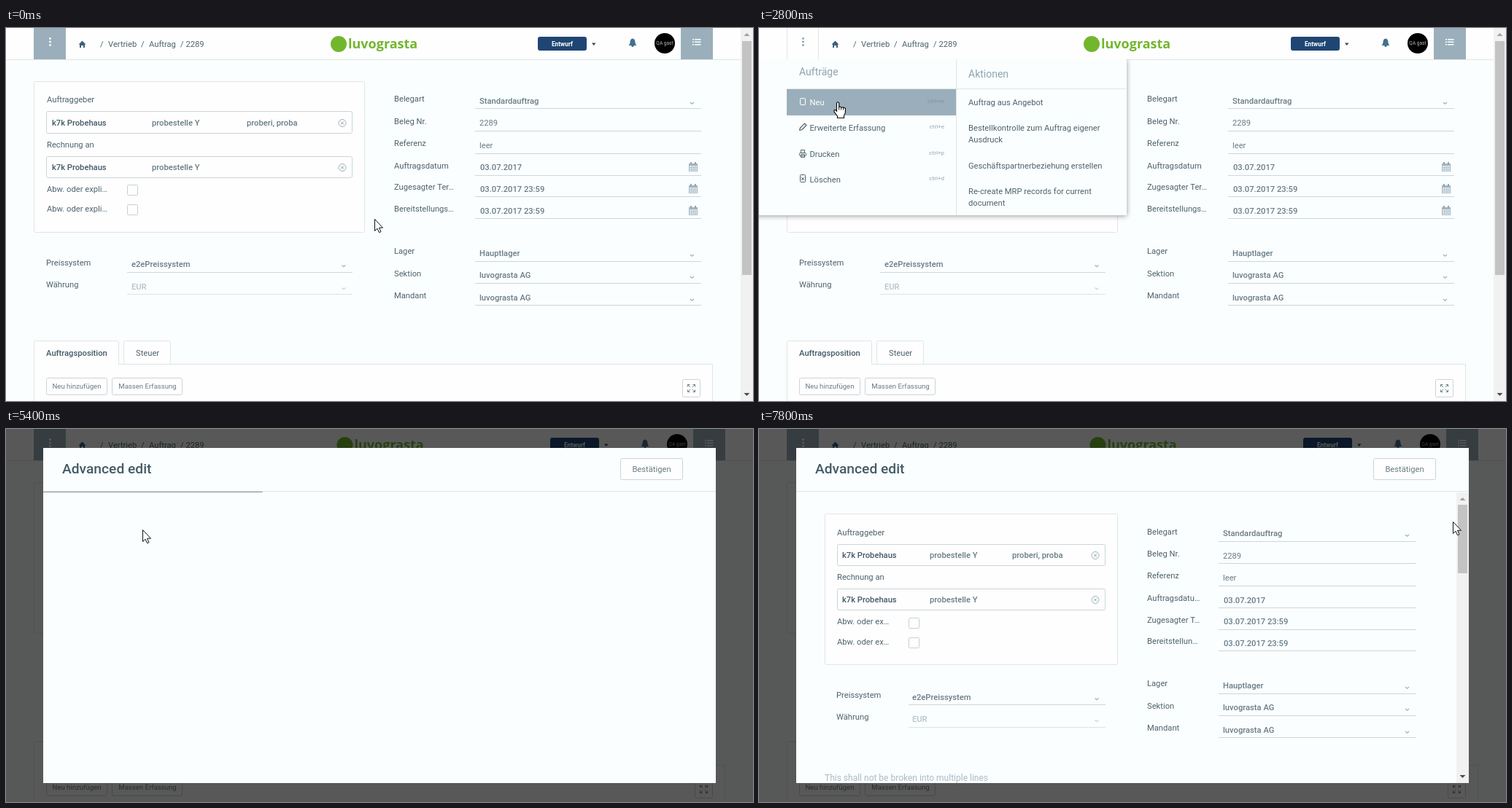
These frames come from a looping animation (1024x512 px, 8 s). An HTML page with a canvas:

```html
<!DOCTYPE html>
<html lang="de">
<head>
<meta charset="utf-8">
<title>Auftrag</title>
<style>
html, body { margin: 0; width: 100%; height: 100%; overflow: hidden; background: #fbfefe; }
canvas { display: block; }
</style>
</head>
<body>
<canvas id="stage" width="1024" height="512"></canvas>
<script>
const ctx = document.getElementById('stage').getContext('2d');
const LOOP = 8000, STEP = 200;
const C = {
  page: '#fbfefe', panel: '#fefefe', border: '#dfe5e7', box: '#cbd4d8', line: '#ccd6da',
  label: '#4d636e', dark: '#435a66', value: '#697c86', pale: '#b4c2ca', steel: '#9aafbb',
  steelDark: '#5a788a', navy: '#1f4673', icon: '#3c617f', green: '#72b62e'
};
const ORG = 'luvograsta', FIRM = 'k7k Probehaus', PLACE = 'probestelle Y', PERSON = 'proberi, proba';

// time, x, y of the pointer tip
const PATH = [
  [0, 505, 262], [200, 505, 262], [1400, 60, 29], [2200, 60, 29], [2800, 108, 101],
  [3200, 77, 128], [4000, 246, 144], [4200, 246, 144], [5000, 187, 138], [5800, 187, 138],
  [6200, 243, 138], [7000, 824, 193], [7200, 824, 193], [7800, 951, 127], [8000, 951, 127]
];

// label, short label, value, kind, y of label, value and underline
const ROWS = [
  ['Belegart', '', 'Standardauftrag', 'select', 97.3, 100, 110.3],
  ['Beleg Nr.', '', '2289', 'plain', 128, 130.3, 141],
  ['Referenz', '', 'leer', 'plain', 158, 161, 172],
  ['Auftragsdatum', 'Auftragsdatu…', '03.07.2017', 'date', 189, 191.3, 202],
  ['Zugesagter Ter…', 'Zugesagter T…', '03.07.2017 23:59', 'date', 218.3, 221, 231.3],
  ['Bereitstellungs…', 'Bereitstellun…', '03.07.2017 23:59', 'date', 248, 251, 261],
  ['Lager', '', 'Hauptlager', 'select', 306, 309, 320],
  ['Sektion', '', ORG + ' AG', 'select', 337, 339, 350],
  ['Mandant', '', ORG + ' AG', 'select', 367, 370, 380]
];
const WIDE = { dy: 0, panel: 38, label: 56, box: 55, cols: [63, 200, 330], check: 166, value: 172, field: 643, end: 953 };
const NARROW = { dy: 43.4, panel: 90, label: 107, box: 107, cols: [114, 234, 347], check: 205, value: 210, field: 630, end: 901, short: true };

function rect(x, y, w, h, color) {
  ctx.fillStyle = color;
  ctx.fillRect(x, y, w, h);
}

function frame(x, y, w, h, stroke, fill, r = 2) {
  ctx.beginPath();
  ctx.roundRect(x + .5, y + .5, w - 1, h - 1, r);
  if (fill) { ctx.fillStyle = fill; ctx.fill(); }
  ctx.strokeStyle = stroke;
  ctx.lineWidth = 1;
  ctx.stroke();
}

function disc(x, y, r, color) {
  ctx.beginPath();
  ctx.arc(x, y, r, 0, Math.PI * 2);
  ctx.fillStyle = color;
  ctx.fill();
}

function poly(points, fill, stroke, width = 1) {
  ctx.beginPath();
  points.forEach(([x, y]) => ctx.lineTo(x, y));
  if (fill) { ctx.closePath(); ctx.fillStyle = fill; ctx.fill(); }
  if (stroke) { ctx.strokeStyle = stroke; ctx.lineWidth = width; ctx.stroke(); }
}

// y is the middle of the capitals
function text(str, x, y, color = C.label, { size = 11.2, weight = 400, align = 'left', family = 'Roboto' } = {}) {
  ctx.font = `${weight} ${size}px ${family}, sans-serif`;
  ctx.textAlign = align;
  ctx.fillStyle = color;
  ctx.fillText(str, x, Math.round(y + size * .355));
}

const medium = { weight: 500 };

function chevron(x, y, color = '#9fb0b9') {
  poly([[x - 2.5, y - 1], [x, y + 1.3], [x + 2.5, y - 1]], null, color, 1.2);
}

function calendar(x, y) {
  rect(x, y + 1, 12, 11, '#a3b5bf');
  rect(x + 2, y - 1, 2, 3, '#8fa5b1');
  rect(x + 8, y - 1, 2, 3, '#8fa5b1');
  for (let i = 0; i < 12; i++) rect(x + 1 + i % 4 * 2.7, y + 4 + (i / 4 | 0) * 2.7, 1.9, 1.8, '#f2f7f8');
}

function clearIcon(x, y) {
  ctx.beginPath();
  ctx.arc(x, y, 5, 0, Math.PI * 2);
  ctx.strokeStyle = '#9db1bc';
  ctx.lineWidth = 1;
  ctx.stroke();
  poly([[x - 2, y - 2], [x + 2, y + 2]], null, '#8aa1ae');
  poly([[x + 2, y - 2], [x - 2, y + 2]], null, '#8aa1ae');
}

function scrollbar(x, top, bottom, thumbTop, thumbBottom) {
  const mid = x + 8.5;
  rect(x, top, 17, bottom - top, '#f1f1f1');
  rect(x + 2, thumbTop, 13, thumbBottom - thumbTop, '#c3c3c3');
  poly([[mid - 4, top + 11], [mid, top + 7], [mid + 4, top + 11]], '#a0a0a0');
  poly([[mid - 4, bottom - 11], [mid, bottom - 7], [mid + 4, bottom - 11]], '#4c4c4c');
}

function form(o) {
  const at = y => Math.round(y + o.dy);
  const partner = (label, labelY, boxY, h, valueY, values) => {
    text(label, o.label, at(labelY));
    frame(o.box, at(boxY), 475 - o.box, h, C.box, C.panel);
    values.forEach((v, i) => text(v, o.cols[i], at(valueY), i ? C.value : C.dark, medium));
    clearIcon(461, at(valueY) + .5);
  };
  frame(o.panel, at(73), 492 - o.panel, 208, C.border, C.panel);
  partner('Auftraggeber', 98.3, 114.3, o.short ? 30 : 31, 130, [FIRM, PLACE, PERSON]);
  partner('Rechnung an', 160, 176, 30, 191, [FIRM, PLACE]);
  [[221, 215.3], [248.3, 242.3]].forEach(([labelY, boxY]) => {
    text(o.short ? 'Abw. oder ex…' : 'Abw. oder expli…', o.label, at(labelY));
    frame(o.check, at(boxY), 15, 15, '#c6d0d5', C.panel, 1);
  });
  [['Preissystem', 'e2ePreissystem', 322, 324.3, 335, C.value, C.line],
   ['Währung', 'EUR', 352, 355, 365.3, C.pale, '#dde4e7']].forEach(([label, value, ly, vy, uy, color, under]) => {
    text(label, o.label - 1, at(ly));
    text(value, o.value, at(vy), color, medium);
    rect(o.check, at(uy), 475 - o.check, 1, under);
    chevron(463, at(vy) + 2.5, under === C.line ? undefined : '#ccd6db');
  });
  ROWS.forEach(([label, short, value, kind, ly, vy, uy]) => {
    text(o.short && short || label, 532, at(ly));
    text(value, o.field + (kind === 'date' ? 7 : 6), at(vy), C.value, kind === 'plain' ? {} : medium);
    rect(o.field, at(uy), o.end - o.field, 1, C.line);
    if (kind === 'select') chevron(o.end - 12.5, at(vy) + 3);
    if (kind === 'date' && !o.short) calendar(o.end - 17, at(vy) - 6);
  });
}

function header(dx, button) {
  rect(0, 0, 1024, 43, C.panel);
  rect(0, 43, 1024, 1, C.border);
  rect(38, 0, 44, 43, button);
  if (button === C.panel) {
    rect(38, 0, 1, 43, C.border);
    rect(81, 0, 1, 43, C.border);
  }
  for (let i = 0; i < 3; i++) disc(60.5, 14.5 + i * 4.5, 1.4, button === C.panel ? '#8ba1ae' : '#fff');

  poly([[99.5, 22.5], [104.5, 17.5], [109.5, 22.5], [108, 22.5], [108, 27], [106, 27], [106, 24],
        [103, 24], [103, 27], [101, 27], [101, 22.5]], C.icon);
  [['/', 129], ['Vertrieb', 140], ['/', 185], ['Auftrag', 196], ['/ 2289', 239]]
    .forEach(([s, x]) => text(s, x, 22));

  disc(456 + dx / 2, 22, 11, C.green);
  text(ORG, 469 + dx / 2, 21.5, C.green, { size: 18, weight: 700, family: '"Open Sans"' });

  ctx.save();
  ctx.translate(dx, 0);
  frame(729, 12, 67, 19, C.navy, C.navy);
  text('Entwurf', 762.5, 22, '#fff', { size: 8.4, weight: 700, align: 'center' });
  poly([[803, 20.5], [808.5, 20.5], [805.75, 24]], '#2c4a63');
  ctx.beginPath();
  ctx.moveTo(853.5, 24);
  ctx.bezierCurveTo(857, 21, 854, 15, 859, 14.5);
  ctx.bezierCurveTo(864, 15, 861, 21, 864.5, 24);
  ctx.fillStyle = '#44708f';
  ctx.fill();
  disc(859, 24.5, 1.6, '#44708f');
  disc(903, 21, 14, '#000');
  text('QA gast', 903, 21, '#b5b5b5', { size: 6.6, align: 'center' });
  rect(925, 0, 44, 43, C.steel);
  for (let i = 0; i < 3; i++) {
    rect(941, 15 + i * 3.5, 2, 1.5, '#fff');
    rect(944, 15 + i * 3.5, 8.5, 1.5, '#fff');
  }
  ctx.restore();
}

function tabs(dx) {
  const right = 969 + dx;
  frame(38, 461, right - 38, 80, C.border, C.panel, 0);
  frame(161, 429, 65, 33, C.border, C.panel);
  frame(38, 429, 117, 40, C.border, C.panel);
  rect(39, 461, 115, 10, C.panel);
  rect(154, 462, 1, 8, C.panel);
  text('Auftragsposition', 55, 446, C.dark, medium);
  text('Steuer', 178, 446);
  frame(55, 480, 84, 24, C.box);
  frame(145, 480, 97, 24, C.box);
  text('Neu hinzufügen', 97, 492, C.value, { size: 9.6, align: 'center' });
  text('Massen Erfassung', 194, 492, C.value, { size: 9.6, align: 'center' });
  frame(right - 42, 482, 25, 25, C.box);
  for (const sx of [-1, 1]) for (const sy of [-1, 1]) {
    const x = right - 29.5, y = 494.5;
    poly([[x + sx * 2, y + sy * 5], [x + sx * 5, y + sy * 5], [x + sx * 5, y + sy * 2]], null, '#6d828d');
    poly([[x + sx * 1.5, y + sy * 1.5], [x + sx * 5, y + sy * 5]], null, '#6d828d');
  }
}

function page(button, dx = 0) {
  rect(0, 0, 1024, 512, C.page);
  form(WIDE);
  tabs(dx);
  header(dx, button);
  if (!dx) scrollbar(1007, 0, 512, 18, 339);
}

const ICONS = [
  (y, c) => frame(56, y - 6, 8, 10, c, null, 1.5),
  (y, c) => {
    poly([[55.5, y + 3.5], [56.5, y], [62.5, y - 6], [65, y - 3.5], [59, y + 2.5]], null, c, 1.2);
    poly([[59, y + 2.5], [55.5, y + 3.5]], null, c, 1.2);
  },
  (y, c) => {
    frame(57, y - 6, 6, 5, c, null, 0);
    frame(55, y - 2, 10, 5, c, null, 1);
    frame(57, y, 6, 5, c, null, 0);
  },
  (y, c) => {
    frame(56, y - 7, 8, 11, c, null, 1);
    poly([[58, y - 3], [62, y + 1]], null, c);
    poly([[62, y - 3], [58, y + 1]], null, c);
  }
];

function menu(active) {
  ctx.save();
  ctx.beginPath();
  ctx.rect(0, 43, 1024, 469);
  ctx.clip();
  ctx.shadowColor = 'rgba(0,0,0,.4)';
  ctx.shadowBlur = 7;
  ctx.shadowOffsetY = 1;
  rect(-10, 43, 514, 214, C.page);
  ctx.restore();
  rect(270, 43, 1, 214, C.border);
  rect(38, 83, 465, 1, C.border);
  text('Aufträge', 55, 60, '#8ea4b0', { size: 14 });
  text('Aktionen', 287, 63, '#8ea4b0', { size: 14 });
  ['Neu', 'Erweiterte Erfassung', 'Drucken', 'Löschen'].forEach((item, i) => {
    const on = i === active, y = Math.round(102 + i * 35.3), color = on ? '#fff' : C.label;
    if (on) rect(38, 84 + i * 35, 232, 36, C.steel);
    ICONS[i](y, color);
    text(item, 69.5, y, color);
    text('ctrl+' + 'mepd'[i], 254, y - 2, on ? '#8399a6' : '#a9b9c2', { size: 8, weight: 500, align: 'right' });
  });
  [['Auftrag aus Angebot', 102], ['Bestellkontrolle zum Auftrag eigener', 137], ['Ausdruck', 153],
   ['Geschäftspartnerbeziehung erstellen', 189], ['Re-create MRP records for current', 224], ['document', 240]]
    .forEach(([s, y]) => text(s, 287, y));
}

function modal(t) {
  const loaded = t >= 5800;
  rect(0, 0, 1024, 512, 'rgba(0,0,0,.65)');
  ctx.save();
  ctx.beginPath();
  ctx.rect(51, 26, 922, 460);
  ctx.clip();
  rect(51, 26, 922, 460, C.page);
  text('Advanced edit', 77, 54, C.dark, { size: 19.2, weight: 500 });
  frame(842, 40, 86, 30, C.box, C.panel);
  text('Bestätigen', 885, 55, C.value, { align: 'center' });
  rect(51, 85, 922, 1, C.border);
  if (loaded) {
    form(NARROW);
    text('This shall not be broken into multiple lines', 90, 479, '#a9bbc5', { size: 12 });
    scrollbar(956, 87, 486, 104, 198);
    if (t < 6400) rect(51, 86, 922, 1.5, '#9bc83c');
  } else {
    rect(51, 86, 922 * (t < 5600 ? .326 : .66), 1, '#87939a');
  }
  ctx.restore();
}

function pointer(t) {
  const i = Math.max(1, PATH.findIndex(p => p[0] >= t));
  const [t0, x0, y0] = PATH[i - 1], [t1, x1, y1] = PATH[i];
  const k = (t - t0) / (t1 - t0), e = k * k * (3 - 2 * k);
  return [Math.round(x0 + (x1 - x0) * e), Math.round(y0 + (y1 - y0) * e)];
}

function arrow() {
  poly([[.5, .5], [.5, 16.5], [4, 13.2], [6.5, 18.7], [9, 17.7], [6.5, 12.2], [11.5, 12.2], [.5, .5]], '#fff', '#111');
}

function hand() {
  ctx.beginPath();
  ctx.moveTo(-1.5, 13);
  ctx.lineTo(-1.5, 2);
  ctx.quadraticCurveTo(0, -.8, 1.7, 2);
  ctx.lineTo(1.7, 7.5);
  for (const x of [1.7, 4.6, 7.5]) ctx.quadraticCurveTo(x + 1.9, 5.5 + x / 3, x + 2.9, 8 + x / 6);
  ctx.lineTo(10.4, 14.5);
  ctx.quadraticCurveTo(10, 17, 8.5, 19);
  ctx.lineTo(8.5, 22.5);
  ctx.lineTo(-.5, 22.5);
  ctx.lineTo(-.5, 20);
  ctx.lineTo(-5, 14);
  ctx.quadraticCurveTo(-5.5, 11, -3, 11.5);
  ctx.closePath();
  ctx.fillStyle = '#fff';
  ctx.fill();
  ctx.strokeStyle = '#111';
  ctx.lineWidth = 1.2;
  ctx.stroke();
  for (const x of [1.7, 4.6, 7.5]) poly([[x, 7.5], [x, 11.5]], null, '#111');
}

function draw(now) {
  const t = Math.floor(now % LOOP / STEP) * STEP;
  const [x, y] = pointer(t);
  if (t >= 5400) {
    page(C.steel, 17);
    modal(t);
  } else if (t >= 2200) {
    page(C.panel);
    menu(y < 84 ? -1 : y < 119 ? 0 : 1);
  } else {
    page(t >= 1600 ? C.steelDark : C.steel);
  }
  ctx.save();
  ctx.translate(x, y);
  if (t >= 1400 && t < 5400) hand(); else arrow();
  ctx.restore();
}

const start = performance.now();
function tick() {
  draw(performance.now() - start);
  requestAnimationFrame(tick);
}
tick();
</script>
</body>
</html>
```
